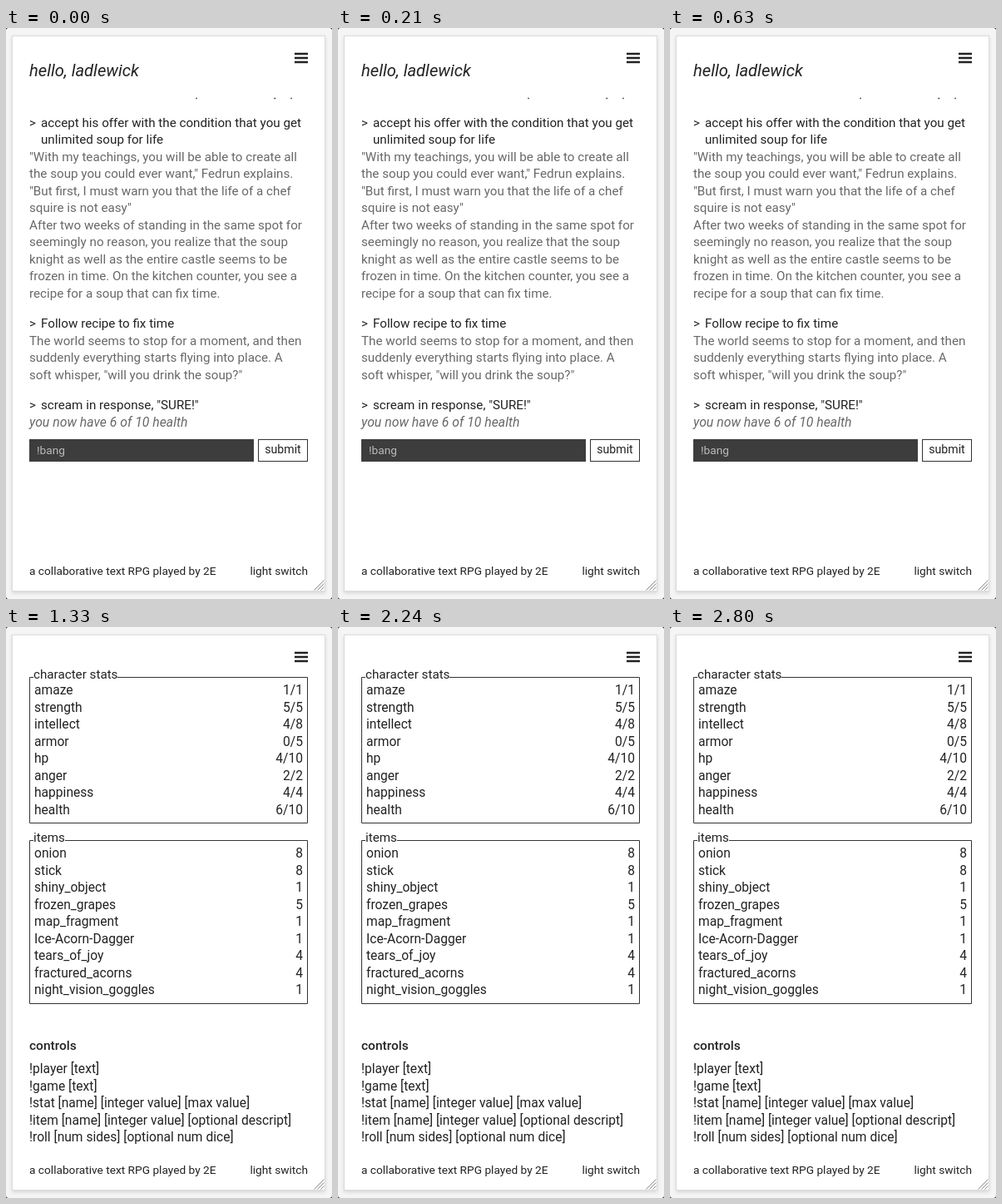
These frames come from a looping animation (392 px wide and 686 px high, 3.01 s). An HTML page:

```html
<!DOCTYPE html>
<html lang="en">
<head>
<meta charset="utf-8">
<title>Collaborative text RPG</title>
<style>
  html, body { margin: 0; width: 100%; height: 100%; overflow: hidden; background: #222; }
  svg { display: block; width: 392px; height: 686px; }
  text { font-family: Roboto, "Open Sans", sans-serif; fill: #222; white-space: pre; }
  .log { font-size: 15.2px; }
  .gray { fill: #686868; }
  .note { font-size: 15.8px; font-style: italic; }
  .title { font-size: 20.2px; font-style: italic; }
  .row { font-size: 15.6px; }
  .head { font-size: 15.5px; font-weight: 500; }
  .small { font-size: 13.7px; }
  .button { font-size: 14.1px; }
  .input { fill: #bbb; }
  .end { text-anchor: end; }
  .mid { text-anchor: middle; }
  .frame { fill: none; stroke: #333; stroke-width: 1; }
  .card { fill: #fff; stroke: #dcdcdc; filter: drop-shadow(0 2px 2px rgba(0, 0, 0, .13)); }
  .grip { stroke: #8a8a8a; stroke-width: 1; }

  /* hard cut between the two pages at 1330 ms of 3010 ms */
  #story { animation: first 3010ms step-end infinite; }
  #sheet { animation: second 3010ms step-end infinite; }
  @keyframes first { 0% { visibility: visible; } 44.186%, 100% { visibility: hidden; } }
  @keyframes second { 0% { visibility: hidden; } 44.186%, 100% { visibility: visible; } }
</style>
</head>
<body>
<svg viewBox="0 0 392 686">
  <rect width="392" height="686" rx="3" fill="#f5f5f5"/>
  <rect class="card" x="7.5" y="9.5" width="376" height="667"/>
  <path d="M347 31h16M347 36h16M347 41h16" stroke="#222" stroke-width="2.4"/>
  <path class="grip" d="M370.5 675.5l12-12M374.5 675.5l8-8M378.5 675.5l4-4"/>
  <g id="footer"></g>

  <g id="story">
    <path d="M228 84.5h2M322 84.5h2.5M342 84.5h2" stroke="#686868" stroke-width="1.4"/>
    <rect x="28" y="494" width="270" height="27" fill="#3d3d3d"/>
    <rect class="frame" x="303.5" y="494.5" width="59" height="26"/>
  </g>

  <g id="sheet">
    <path class="frame" d="M33 60.5H28.5V235.5H362.5V60.5H134"/>
    <path class="frame" d="M33 256.5H28.5V452.5H362.5V256.5H71"/>
  </g>
</svg>
<script>
  const LINE = 20.5;
  const layer = id => document.getElementById(id);
  const story = layer('story'), sheet = layer('sheet'), footer = layer('footer');

  function put(parent, x, y, str, cls) {
    const t = document.createElementNS(parent.namespaceURI, 'text');
    t.setAttribute('x', x);
    t.setAttribute('y', Math.round(y));
    t.setAttribute('class', cls);
    t.textContent = str;
    parent.append(t);
  }

  const lines = (parent, x, y, list, cls) =>
    list.forEach((s, i) => put(parent, x, y + i * LINE, s, cls));

  function command(y, ...list) {
    put(story, 28, y, '>', 'log');
    lines(story, 42, y, list, 'log');
  }

  function table(y, title, rows) {
    put(sheet, 33, y - 19.5, title, 'log');
    rows.forEach(([name, value], i) => {
      put(sheet, 34, y + i * LINE, name, 'row');
      put(sheet, 357, y + i * LINE, value, 'row end');
    });
  }

  put(footer, 28, 657, 'a collaborative text RPG played by 2E', 'small');
  put(footer, 363, 657, 'light switch', 'small end');

  put(story, 28, 58, 'hello, ladlewick', 'title');
  command(118.6, 'accept his offer with the condition that you get', 'unlimited soup for life');
  lines(story, 28, 159.6, [
    '"With my teachings, you will be able to create all',
    'the soup you could ever want," Fedrun explains.',
    '"But first, I must warn you that the life of a chef',
    'squire is not easy"',
    'After two weeks of standing in the same spot for',
    'seemingly no reason, you realize that the soup',
    'knight as well as the entire castle seems to be',
    'frozen in time. On the kitchen counter, you see a',
    'recipe for a soup that can fix time.'
  ], 'log gray');
  command(360, 'Follow recipe to fix time');
  lines(story, 28, 380.5, [
    'The world seems to stop for a moment, and then',
    'suddenly everything starts flying into place. A',
    'soft whisper, "will you drink the soup?"'
  ], 'log gray');
  command(458, 'scream in response, "SURE!"');
  put(story, 28, 478.5, 'you now have 6 of 10 health', 'note gray');
  put(story, 37, 512, '!bang', 'small input');
  put(story, 333, 511, 'submit', 'button mid');

  table(81, 'character stats', [
    ['amaze', '1/1'], ['strength', '5/5'], ['intellect', '4/8'], ['armor', '0/5'],
    ['hp', '4/10'], ['anger', '2/2'], ['happiness', '4/4'], ['health', '6/10']
  ]);
  table(277, 'items', [
    ['onion', 8], ['stick', 8], ['shiny_object', 1], ['frozen_grapes', 5],
    ['map_fragment', 1], ['Ice-Acorn-Dagger', 1], ['tears_of_joy', 4],
    ['fractured_acorns', 4], ['night_vision_goggles', 1]
  ]);
  put(sheet, 28, 507.5, 'controls', 'head');
  lines(sheet, 28, 536, [
    '!player [text]',
    '!game [text]',
    '!stat [name] [integer value] [max value]',
    '!item [name] [integer value] [optional descript]',
    '!roll [num sides] [optional num dice]'
  ], 'row');
</script>
</body>
</html>
```
